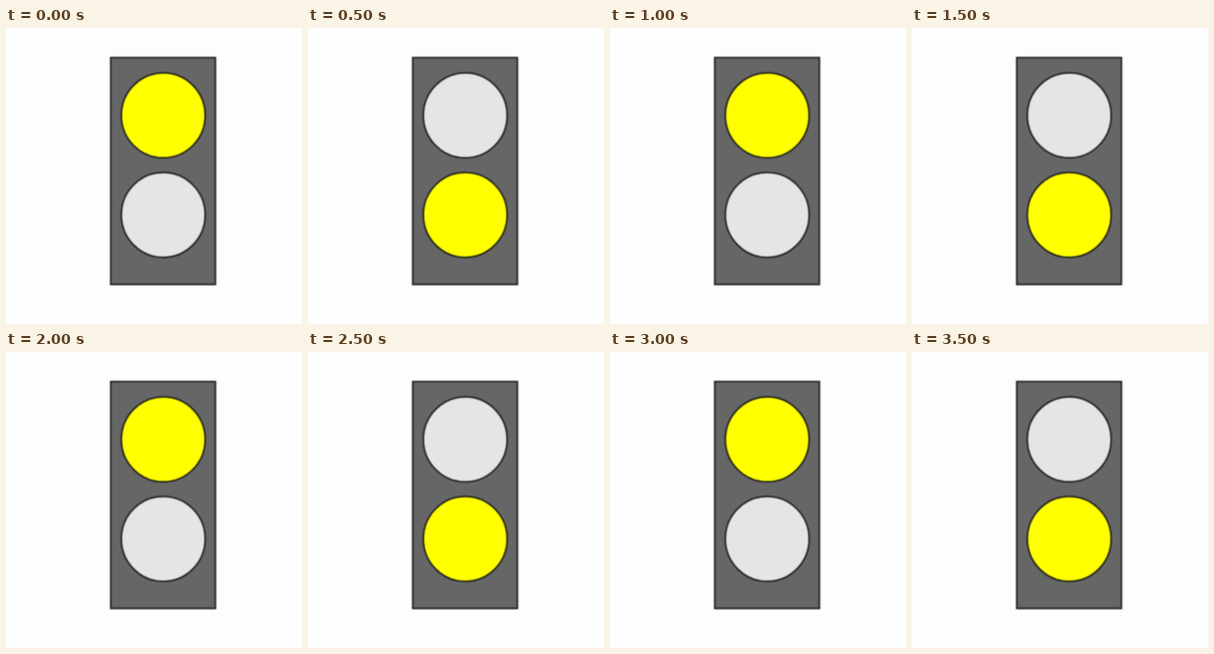
An HTML page that plays this animation: 512x512 px, repeating every 4 s.

```html
<!DOCTYPE html>
<html lang="en">
<head>
<meta charset="utf-8">
<title>Flashing signal</title>
<style>
  html, body { margin: 0; width: 100%; height: 100%; overflow: hidden; background: #fcfdff; }
  svg { display: block; width: 100%; height: 100%; }
</style>
</head>
<body>
<svg viewBox="0 0 512 512">
  <filter id="soften" color-interpolation-filters="sRGB">
    <feGaussianBlur stdDeviation="0.8"/>
  </filter>
  <g filter="url(#soften)" stroke="#1c1c1c" stroke-width="2.7">
    <rect x="181.2" y="51.2" width="181" height="392.4" fill="#666"/>
    <ellipse id="upper" cx="272" cy="151.2" rx="72.5" ry="73.5" fill="#ff0"/>
    <ellipse id="lower" cx="272" cy="323.3" rx="72.5" ry="73.5" fill="#e5e5e5"/>
  </g>
</svg>
<script>
  const ON = "#ff0", OFF = "#e5e5e5", HALF_PERIOD = 500;
  const upper = document.getElementById("upper");
  const lower = document.getElementById("lower");

  function draw() {
    const upperLit = Math.floor(performance.now() / HALF_PERIOD) % 2 === 0;
    upper.setAttribute("fill", upperLit ? ON : OFF);
    lower.setAttribute("fill", upperLit ? OFF : ON);
    requestAnimationFrame(draw);
  }
  draw();
</script>
</body>
</html>
```
